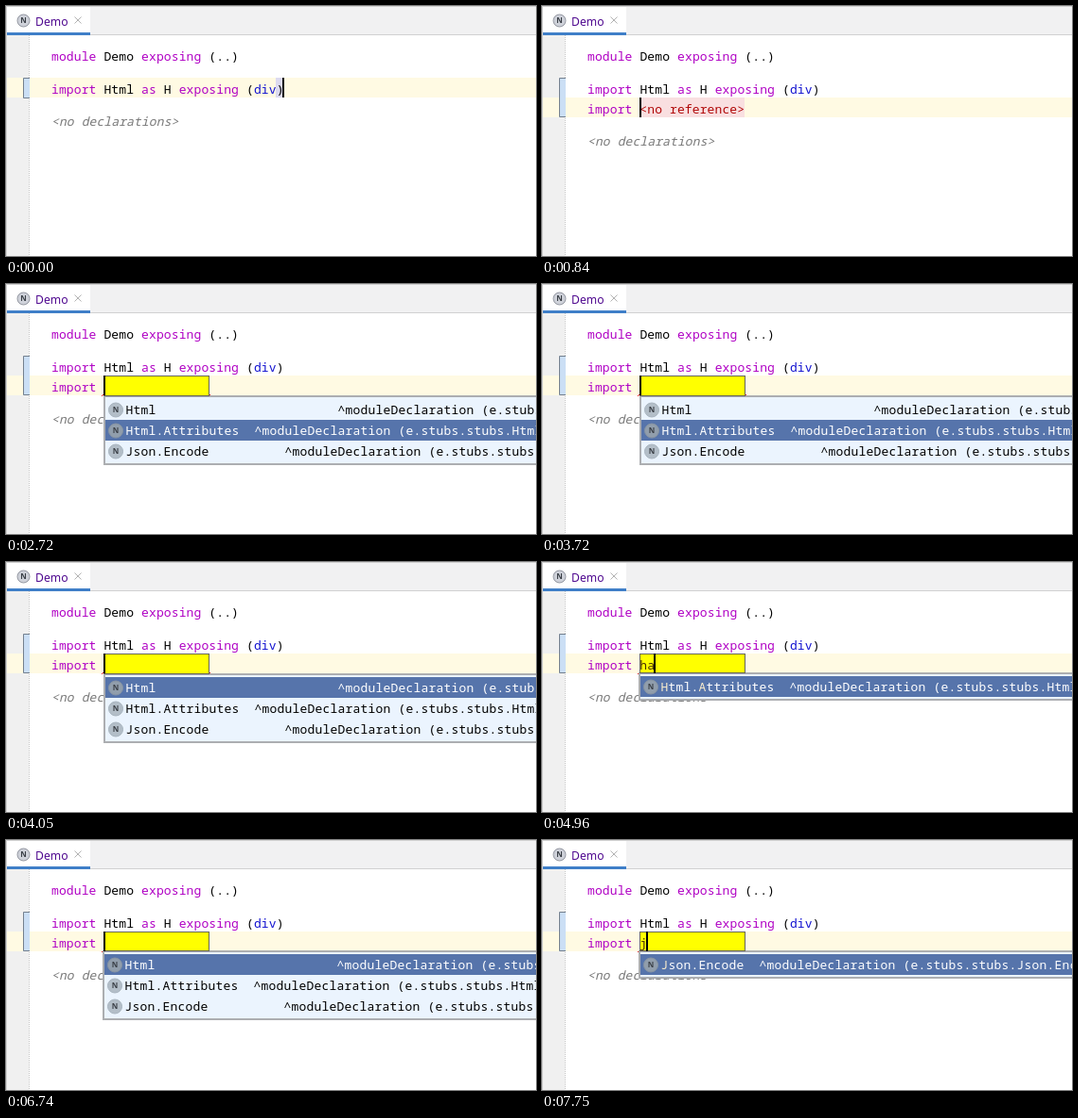
Animation of 560 by 265 pixels, one loop 8 s. Source, as an HTML page:

```html
<!DOCTYPE html>
<html lang="en">
<head>
<meta charset="utf-8">
<title>Import completion</title>
<style>
  html, body { margin: 0; width: 100%; height: 100%; overflow: hidden; background: #fff; }
  svg { display: block; width: 560px; height: 265px; }
  text { white-space: pre; }
  .code { font: 13px "Noto Sans Mono", monospace; letter-spacing: .12px; }
  .item { letter-spacing: .2px; }
  .key { fill: #b000c4; }
  .ref { fill: #1414d0; }
  .icon { font: 600 8px "Noto Sans", sans-serif; text-anchor: middle; fill: #3a3f46; }
  .tab { font: 12.2px "Noto Sans", sans-serif; fill: #500a90; }
</style>
</head>
<body>
<svg id="stage" viewBox="0 0 560 265"></svg>
<script>
const LOOP = 8000;
const CHAR = 7.92;
const MODULES = ['Html', 'Html.Attributes', 'Json.Encode'];

// Each step changes only the listed properties.
const STEPS = [
  [0, { caret: true, line: 0 }],
  [150, { caret: false }],
  [610, { caret: true }],
  [840, { line: 1 }],
  [990, { error: true }],
  [1620, { caret: false }],
  [1770, { caret: true, typed: '', rows: [0, 1, 2], pick: 0, shift: 0 }],
  [2720, { pick: 1 }],
  [3020, { pick: 2 }],
  [3720, { pick: 1 }],
  [4050, { pick: 0 }],
  [4810, { typed: 'h', rows: [0, 1], shift: 1 }],
  [4885, { typed: 'ha' }],
  [4960, { rows: [1] }],
  [6280, { typed: 'h', rows: [0, 1] }],
  [6740, { typed: '', rows: [0, 1, 2] }],
  [7750, { typed: 'j', rows: [2] }]
];

const rect = (x, y, w, h, fill, extra = '') =>
  `<rect x="${x}" y="${y}" width="${w}" height="${h}" fill="${fill}" ${extra}/>`;
const escape = s => s.replace(/</g, '&lt;').replace(/>/g, '&gt;');
const span = (s, attr) => `<tspan ${attr}>${escape(s)}</tspan>`;
const key = s => span(s, 'class="key"');
const code = (x, y, body, attr = '', kind = '') =>
  `<text class="code ${kind}" x="${x}" y="${y}" ${attr}>${body}</text>`;
const slanted = (x, y, body, fill) =>
  code(0, 0, body, `fill="${fill}" transform="translate(${x} ${y}) skewX(-13)"`);
const icon = (x, y, r, fill, stroke) =>
  `<circle cx="${x}" cy="${y}" r="${r}" fill="${fill}" stroke="${stroke}"/>` +
  `<text class="icon" x="${x}" y="${y + 2.9}">N</text>`;

function frame() {
  return rect(0, 0, 560, 30, '#f1f1f2') +
    rect(0, 0, 560, 1, '#d0d0d0') +
    rect(1, 1, 88, 29, '#fff') +
    rect(0, 30, 560, 1, '#d1d1d1') +
    rect(1, 28, 88, 3, '#3f7fc8') +
    icon(18.5, 15.5, 6.5, '#cfd2da', '#9296a0') +
    '<text class="tab" x="31" y="20.5">Demo</text>' +
    '<path d="M72.5 11.5l7 7m0-7l-7 7" stroke="#b3b3b3" fill="none"/>' +
    rect(1, 31, 23, 234, '#f0f0f0');
}

function gutter(line) {
  const h = line ? 41 : 21;
  return '<path d="M24.5 31V265" stroke="#c4c4c4" stroke-dasharray="1 1"/>' +
    rect(0, 0, 1, 265, '#d0d0d0') +
    rect(18, 76, 7, h + 1, '#cbdff5') +
    `<path d="M25 76.5H18.5v${h}H25" fill="none" stroke="#74808e"/>`;
}

function squiggle() {
  let d = 'M101 119';
  for (let i = 0; i < 29; i++) d += 'l2 -2l2 2';
  return `<path d="${d}" fill="none" stroke="#f02020"/>`;
}

function matches(name, typed) {
  if (!typed) return [];
  return typed.length > 1 ? [0, name.indexOf('A')] : [0];
}

function popup({ rows, pick, shift, typed }) {
  const x = 103 - shift, y = 118 - shift;
  const widest = Math.max(...rows.map(i => MODULES[i].length));
  let out = rect(x, y, 470, rows.length * 22 + 8, '#acaeb1') +
    rect(x + 2, y + 2, 468, rows.length * 22 + 4, '#ebf4fe');
  rows.forEach((id, n) => {
    const top = y + 4 + n * 22, on = n === pick;
    const name = MODULES[id], hits = matches(name, typed);
    const lit = `fill="${on ? '#f9eccc' : '#b000b0'}"`;
    const label = [...name].map((c, i) => hits.includes(i) ? span(c, lit) : c).join('');
    const pad = ' '.repeat(2 + 2 * (widest - name.length));
    if (on) out += rect(x + 2, top, 468, 22, '#5674ab');
    out += icon(x + 13, top + 11.5, 7.5, on ? '#919eac' : '#b3bec8', on ? '#8794a3' : '#a8b4bf') +
      code(x + 23.5, top + 16, `${label}${pad}^moduleDeclaration (e.stubs.stubs.${name})`,
        `fill="${on ? '#fff' : '#000'}"`, 'item');
  });
  return out;
}

function field({ typed, shift }) {
  return rect(103.5, 97.5, 111, 21 - shift, '#ff0', 'stroke="#66665e"') +
    code(103.3, 114, typed, 'fill="#4a3000"');
}

function draw(s) {
  const top = 76 + 21 * s.line;
  let out = frame() + rect(1, top, 559, 21, '#fffae3') + gutter(s.line);
  if (!s.line) out += rect(285, 76, 8, 21, '#dcdaf0');
  out += code(48, 58, `${key('module')} Demo ${key('exposing')} (..)`) +
    code(48, 93, `${key('import')} Html ${key('as')} H ${key('exposing')} (${span('div', 'class="ref"')})`) +
    slanted(48, 127 + 21 * s.line, escape('<no declarations>'), '#7a7a7a');

  if (s.line) {
    out += code(48, 114, key('import'));
    if (!s.rows) {
      out += rect(103, 97, 111, 21, '#f9dfe0') +
        code(103.3, 114, escape('<no reference>'), 'fill="#b00808"');
    }
    if (s.error) out += squiggle();
    if (s.rows) out += popup(s) + field(s);
  }
  if (s.caret) {
    const x = s.line ? 103 + Math.floor((s.typed || '').length * CHAR) : 292;
    out += rect(x, top, 2, 21, '#000');
  }
  return out;
}

const stage = document.getElementById('stage');
let state = {};
const scenes = STEPS.map(([at, change]) => {
  state = { ...state, ...change };
  return { at, svg: draw(state) };
});

let shown;
function tick() {
  const t = performance.now() % LOOP;
  const scene = scenes.filter(s => s.at <= t).pop();
  if (scene !== shown) {
    stage.innerHTML = scene.svg;
    shown = scene;
  }
  requestAnimationFrame(tick);
}
tick();
</script>
</body>
</html>
```
